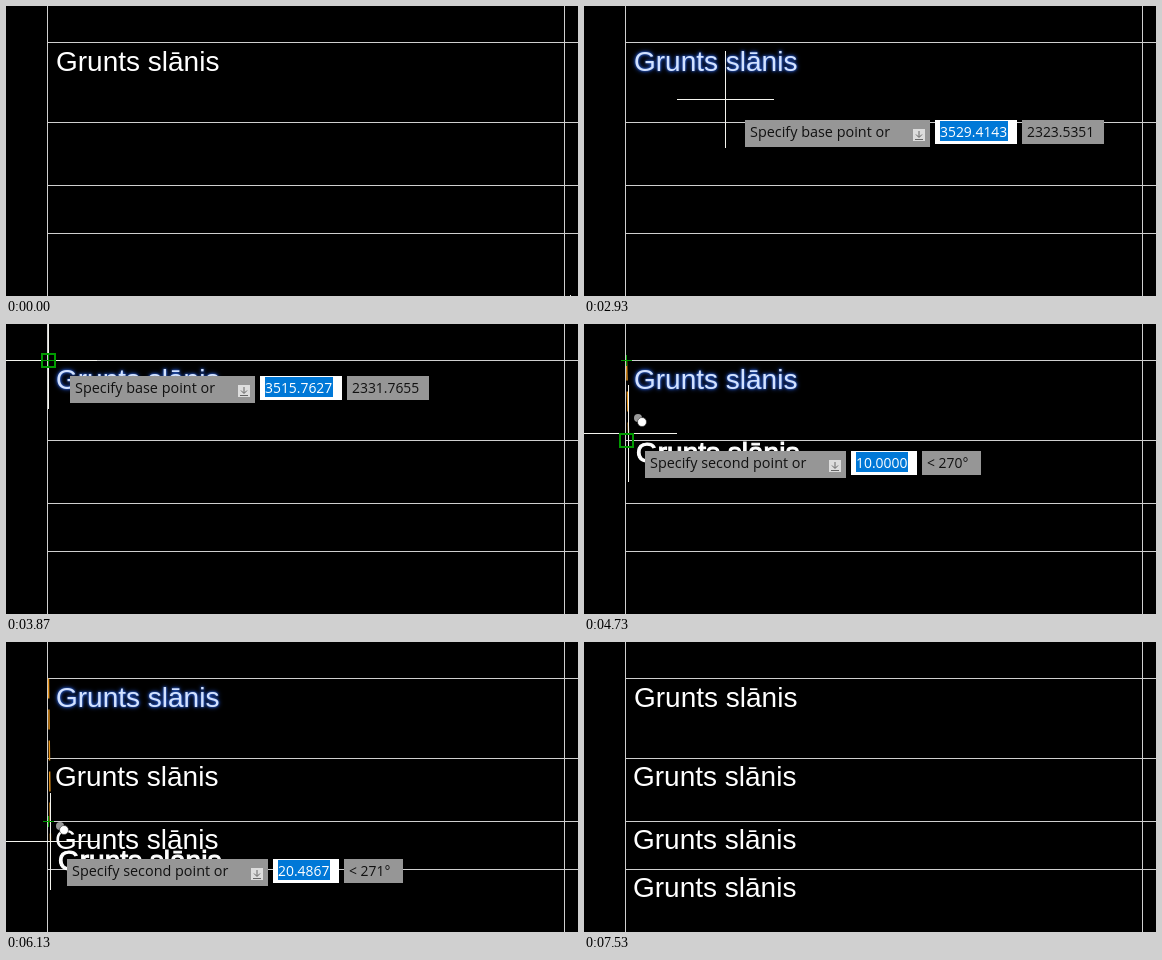
Write an HTML page that moves like this. It is 572 px wide and 290 px high and loops after 8470 ms.

```html
<!DOCTYPE html>
<html lang="lv">
<head>
<meta charset="utf-8">
<title>Copy text to table rows</title>
<style>
html, body { margin: 0; width: 100%; height: 100%; overflow: hidden; background: #000; }
svg { display: block; width: 572px; height: 290px; }
path, rect { shape-rendering: crispEdges; }
.table { stroke: #cfcfcf; fill: none; }
.label { font: 28px "Liberation Sans", Arial, sans-serif; fill: #fff; }
.glow { fill: #d3e2ff; filter: drop-shadow(0 0 1px #2f66d8) drop-shadow(0 0 2px #1d48b0); }
.ghost { stroke: #fff; stroke-width: 1.1px; }
.grip path, .grip rect { fill: #007fff; shape-rendering: auto; }
.cross { stroke: #f4f4ee; fill: none; }
.snap { stroke: #009a00; stroke-width: 2; fill: none; }
.plus { stroke: #009a00; fill: none; }
.band { stroke: #e8941a; stroke-width: 1.4; stroke-dasharray: 20 11; shape-rendering: auto; }
.tip text { font: 14.4px "Open Sans", "Noto Sans", sans-serif; fill: #111; }
.tip .num { font-size: 13.9px; }
.tip .on { fill: #fff; }
.panel { fill: #969696; }
.field { fill: #fff; }
.pick { fill: #0078d7; }
.arrow { fill: none; stroke: #666; shape-rendering: auto; }
</style>
</head>
<body>
<svg viewBox="0 0 572 290">
  <path class="table" d="M41.5 0V290M558.5 0V290M41 36.5H572M41 116.5H572M41 179.5H572M41 227.5H572"/>
  <path class="band" id="band"/>
  <text class="label" id="first" x="50" y="65">Grunts slānis</text>
  <g id="copies">
    <text class="label" x="49" y="144">Grunts slānis</text>
    <text class="label" x="49" y="207">Grunts slānis</text>
    <text class="label" x="49" y="255">Grunts slānis</text>
  </g>
  <text class="label ghost" id="ghost" x="50" y="65">Grunts slānis</text>
  <g class="grip" id="grips">
    <rect x="46" y="37" width="13" height="13"/>
    <path d="M546 37L559 43.5L546 50ZM294.500 98H308.500L301.500 111Z"/>
  </g>
  <g class="cross" id="cross">
    <path id="arms"/>
    <rect id="box" x="-2.500" y="-2.500" width="6" height="6"/>
  </g>
  <rect class="snap" id="snap" x="-6" y="-6" width="13" height="13"/>
  <path class="plus" id="plus" d="M-5 .5H6M.5 -5V6"/>
  <g id="badge">
    <circle cx="10" cy="-15" r="4" fill="#999"/>
    <circle cx="14" cy="-11" r="4.500" fill="#fff" stroke="#222" stroke-width=".6"/>
  </g>
  <g class="tip" id="entry">
    <rect class="panel" width="62" height="22"/>
    <rect class="field" x="1" y="1" width="60" height="20"/>
    <text id="typed" x="5" y="16"></text>
  </g>
  <g class="tip" id="basePrompt"></g>
  <g class="tip" id="nextPrompt"></g>
</svg>
<script>
const $ = id => document.getElementById(id);
const LOOP = 8470, FPS = 15;
const SCALE = 7.944124; // pixels per drawing unit
const BASE = { x: 42, y: 36 };

// pointer path: step, x, y
const PATH = [
  [1, 564, 337], [11, 139, 59], [12, 139, 59], [17, 88, 58], [20, 88, 58], [23, 168, 116],
  [43, 168, 116], [44, 141, 93], [45, 122, 80], [55, 50, 39], [56, 50, 39], [57, 47, 34], [58, 44, 31],
  [64, 44, 31], [72, 44, 112], [75, 44, 112], [83, 44, 169], [84, 44, 178], [87, 44, 178],
  [98, 44, 226], [101, 44, 226], [107, 195, 182], [110, 195, 182],
  [111, 300, 228], [112, 445, 288], [113, 564, 345]
];
// object snaps: marker on, pointer locked, released, row, distance
const SNAPS = [[57, 57, 64, 36, 0], [71, 72, 75, 116, 10], [83, 84, 87, 179, 18], [97, 98, 101, 227, 24]];
const CLICKS = [73, 85, 99];
const HOVER = 11, SELECT = 19, TYPE = 28, COPY = 35, START = 63, END = 108;

function pointer(f) {
  let i = PATH.findIndex(k => k[0] > f);
  if (i < 0) i = PATH.length;
  const a = PATH[Math.max(0, i - 1)], b = PATH[i] || a, n = b[0] - a[0];
  let p = n > 0 ? Math.max(0, (f - a[0]) / n) : 0;
  if (n > 4) p = p * p * (3 - 2 * p);
  return { x: a[1] + (b[1] - a[1]) * p, y: a[2] + (b[2] - a[2]) * p };
}

function makePrompt(group, label, w, w1, w2) {
  const x1 = w + 5, x2 = x1 + w1 + 5;
  group.innerHTML = `
    <rect class="panel" width="${w}" height="27"/>
    <text x="5" y="17">${label}</text>
    <rect x="${w - 17}" y="9" width="12" height="12" fill="#ddd"/>
    <path class="arrow" d="M${w - 11} 11V17M${w - 14} 14.500L${w - 11} 17.500L${w - 8} 14.500M${w - 15} 19.500H${w - 7}"/>
    <rect class="field" x="${x1}" width="${w1}" height="24"/>
    <rect class="pick" x="${x1 + 5}" y="1" width="${w1 - 14}" height="20"/>
    <text class="num on" x="${x1 + 5}" y="17"></text>
    <rect class="panel" x="${x2}" width="${w2}" height="24"/>
    <text class="num" x="${x2 + 5}" y="17"></text>`;
  const nums = group.querySelectorAll('.num');
  return (a, b) => { nums[0].textContent = a; nums[1].textContent = b; };
}
const setBase = makePrompt($('basePrompt'), 'Specify base point or', 185, 82, 82);
const setNext = makePrompt($('nextPrompt'), 'Specify second point or', 201, 66, 59);

const show = (el, on) => el.style.display = on ? '' : 'none';
const move = (el, x, y) => el.setAttribute('transform', `translate(${Math.round(x)} ${Math.round(y)})`);

function draw(f) {
  const raw = pointer(f);
  const snap = SNAPS.find(s => f >= s[0] && f <= s[2]);
  const locked = snap && f >= snap[1];
  const at = locked ? { x: BASE.x, y: snap[3] } : raw;
  const idle = f < COPY || f >= END;
  const copying = f > START && f < END;

  $('first').classList.toggle('glow', f >= HOVER && f < END);
  show($('grips'), f >= SELECT && f < COPY);
  [...$('copies').children].forEach((el, i) => show(el, f >= CLICKS[i]));

  move($('cross'), at.x, at.y);
  $('arms').setAttribute('d', idle
    ? 'M-48 .5H-3M4 .5H49M.5 -48V-3M.5 4V49'
    : 'M-48 .5H49M.5 -48V49');
  show($('box'), idle);

  show($('snap'), snap);
  if (snap) move($('snap'), BASE.x, snap[3]);
  const held = SNAPS.filter(s => f >= s[1]).pop();
  show($('plus'), held && f < END);
  if (held) move($('plus'), BASE.x, held[3]);

  for (const id of ['ghost', 'band', 'badge']) show($(id), copying);
  move($('ghost'), at.x - BASE.x, at.y - BASE.y);
  move($('badge'), at.x, at.y);
  $('band').setAttribute('d', `M42.500 36.500L${at.x + .5} ${at.y}`);

  show($('entry'), f >= TYPE && f < COPY);
  move($('entry'), raw.x + 20, raw.y + 21);
  $('typed').textContent = f < 31 ? 'C' : 'CO';

  show($('basePrompt'), f >= COPY && f < START);
  move($('basePrompt'), raw.x + 20, raw.y + 21);
  const late = pointer(f - .35); // the readout trails the pointer
  const dx = locked ? 0 : (late.x - BASE.x) / SCALE;
  const dy = locked ? 0 : (late.y - 35.66668) / SCALE;
  setBase((3515.7627 + dx).toFixed(4), (2331.7655 - dy).toFixed(4));

  show($('nextPrompt'), copying && !CLICKS.includes(f));
  move($('nextPrompt'), raw.x + 17, raw.y + 18);
  const vx = raw.x - BASE.x, vy = BASE.y - raw.y;
  const dist = snap ? snap[4] : Math.hypot(vx, vy) / SCALE;
  const angle = snap ? (snap[4] ? 270 : 0) : (Math.round(Math.atan2(vy, vx) * 180 / Math.PI) + 360) % 360;
  setNext(dist.toFixed(4), `< ${angle}°`);
}

let last = -1;
const begin = performance.now();
function tick() {
  const t = (performance.now() - begin) % LOOP;
  const f = Math.floor((t + 4) * FPS / 1000);
  if (f !== last) draw(last = f);
  requestAnimationFrame(tick);
}
tick();
</script>
</body>
</html>
```
